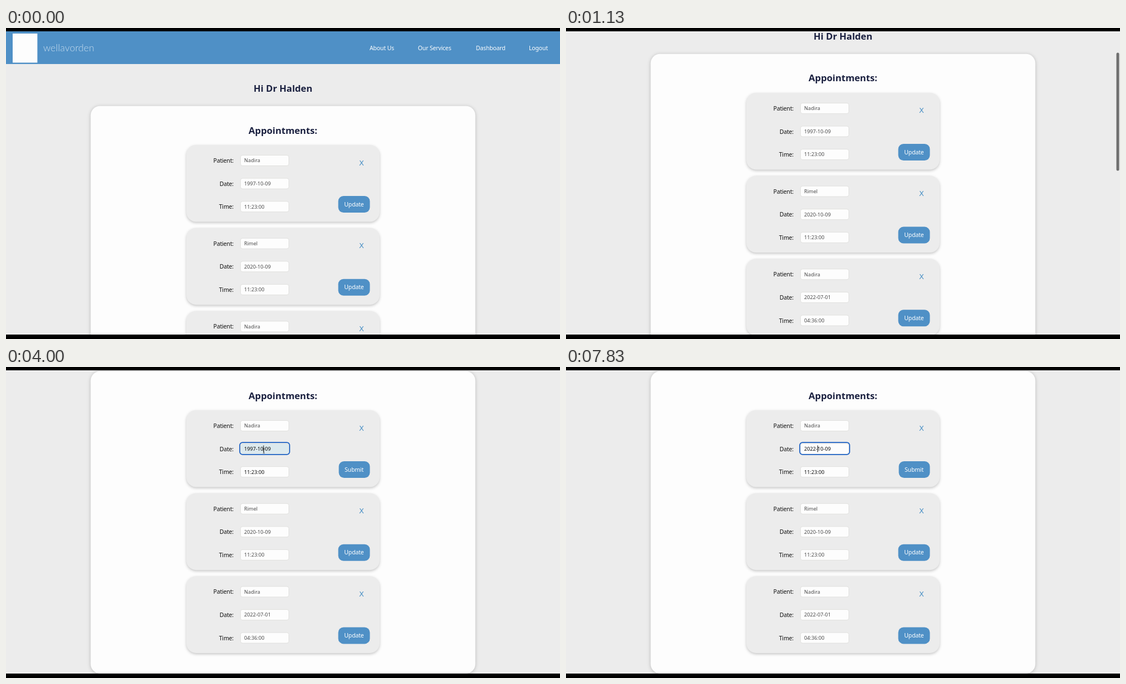
An HTML page that plays this animation: 998 by 561 pixels, repeating every 8 s.

```html
<!DOCTYPE html>
<html lang="en">
<head>
<meta charset="utf-8">
<title>Appointments</title>
<style>
  html, body { margin: 0; width: 100%; height: 100%; overflow: hidden; background: #000; }
  svg { display: block; width: 100vw; height: 100vh; }
  text { font: 10.5px "Noto Sans", "Open Sans", sans-serif; letter-spacing: -.15px; fill: #111; }
  .title { font-size: 16.7px; font-weight: 700; letter-spacing: 0; fill: #1b2140; text-anchor: middle; }
  .nav, .action { fill: #fff; }
  .action { text-anchor: middle; }
  .brand { font: 300 17.5px Lato, sans-serif; letter-spacing: .1px; fill: #c6dcee; }
  .label { text-anchor: end; }
  .value { font-size: 9.2px; letter-spacing: 0; fill: #4c4c4c; }
  .value.live { fill: #0c0c0c; }
  .close { font: 13px "DejaVu Sans", sans-serif; fill: #4a90c5; text-anchor: middle; }
  .field { fill: #fdfdfd; stroke: #e0e0de; }
  .panel { fill: #fdfdfd; filter: drop-shadow(0 1px 3px rgba(0, 0, 0, .22)); }
  .card { fill: #ececec; filter: drop-shadow(0 2px 2.5px rgba(0, 0, 0, .22)); }
</style>
</head>
<body>
<svg id="stage" viewBox="0 0 998 561" preserveAspectRatio="none"></svg>
<script>
const LOOP = 8000;
const BLUE = '#4f90c6';
const SCROLL_END = 133;
const FIELD_X = 422, ROW = 41.6, PITCH = 149.7;

const appointments = [
  ['Nadira', '1997-10-09', '11:23:00'],
  ['Rimel', '2020-10-09', '11:23:00'],
  ['Nadira', '2022-07-01', '04:36:00'],
];

// Pointer stops: time, x, y
const pointerStops = [
  [1600, 700, 566], [2250, 607, 183.5], [3000, 607, 183.5],
  [3800, 464.5, 151], [4230, 464.5, 151], [4570, 477, 163],
];

// Edits of the focused date: time, text, caret index
const edits = [
  [3950, '1997-10-09', 7], [4970, '1997-10-09', 6], [5070, '1997-10-09', 5],
  [5330, '1997-10-09', 4], [5830, '199-10-09', 3], [5900, '19-10-09', 2],
  [6000, '1-10-09', 1], [6070, '-10-09', 0], [6470, '2-10-09', 1],
  [6870, '20-10-09', 2], [7050, '202-10-09', 3], [7230, '2022-10-09', 4],
  [7830, '2022-10-09', 5],
];

const rect = (x, y, w, h, r, attrs) =>
  `<rect x="${x}" y="${y}" width="${w}" height="${h}" rx="${r}" ${attrs}/>`;
const text = (x, y, cls, str, attrs = '') =>
  `<text x="${x}" y="${y}" class="${cls}" ${attrs}>${str}</text>`;

function fieldRow(label, value, row, card) {
  const y = 18 + row * ROW;
  const id = `c${card}r${row}`;
  return text(410, y + 14, 'label', label + ':') +
    rect(FIELD_X + .5, y + .5, 87, 19, 3.5, `class="field" id="${id}box"`) +
    text(429, y + 13.3, 'value', value, `id="${id}"`);
}

function card(values, i) {
  const rows = ['Patient', 'Date', 'Time'].map((l, r) => fieldRow(l, values[r], r, i));
  return `<g transform="translate(0 ${211 + i * PITCH})">
    ${rect(325, 0, 348, 138.5, 17.5, 'class="card"')}${rows.join('')}
    ${text(640.5, 36.5, 'close', 'X')}
    ${rect(598.5, 92, 57, 30, 9.5, `fill="${BLUE}" id="button${i}"`)}
    ${text(627, 110.8, 'action', 'Update', `id="action${i}"`)}
  </g>`;
}

const nav = [[655, 'About Us'], [742, 'Our Services'], [846.5, 'Dashboard'], [942, 'Logout']];

const stage = document.getElementById('stage');
stage.innerHTML = `
  <defs><clipPath id="view"><rect y="6" width="998" height="547"/></clipPath></defs>
  <rect width="998" height="561"/>
  <g clip-path="url(#view)">
    <rect y="6" width="998" height="547" fill="#ececec"/>
    <g id="page">
      <rect y="6" width="998" height="59" fill="${BLUE}"/>
      ${rect(12, 10, 44.5, 52.5, 0, 'fill="#fdfdfd"')}
      ${text(67, 41.5, 'brand', 'wellavorden')}
      ${nav.map(([x, s]) => text(x, 40, 'nav', s)).join('')}
      ${text(499, 115, 'title', 'Hi Dr Halden')}
      ${rect(152.5, 140.8, 693, 545, 17, 'class="panel"')}
      ${text(499, 190.5, 'title', 'Appointments:')}
      ${appointments.map(card).join('')}
    </g>
    ${rect(421.1, 136.1, 89.8, 21.8, 5, 'id="ring" fill="none" stroke="#1b60c4" stroke-width="1.7"')}
    <rect id="caret" y="141.5" width="1" height="12" fill="#111"/>
    ${rect(991.5, 0, 5, 213, 2.5, 'id="thumb" fill="#6f6f6f"')}
    <g id="pointer">
      <path id="arrow" d="M0 0V10L2.3 7.9L3.8 11.3L5.4 10.6L3.9 7.3H7Z"
        fill="#111" stroke="#fff" stroke-width=".8"/>
      <path id="hand" d="M-.9 .8Q0-.6 .9 .8V4L4.8 4.8Q6.2 5.2 6 6.8L5.2 10.5H-.5L-3 6.8Q-3.2 5.4-1.9 5.8L-.9 6.8Z"
        fill="#fff" stroke="#111" stroke-width=".8"/>
      <path id="beam" d="M-1.6-4.5Q0-4.5 0-3.5Q0-4.5 1.6-4.5M0-3.5V3.5M-1.6 4.5Q0 4.5 0 3.5Q0 4.5 1.6 4.5"
        fill="none" stroke="#333" stroke-width=".9"/>
    </g>
  </g>`;

const $ = id => document.getElementById(id);
const set = (id, attrs) => {
  for (const k in attrs) $(id).setAttribute(k, attrs[k]);
};
const show = (id, on) => set(id, { visibility: on ? 'visible' : 'hidden' });
const ramp = (t, a, b) => Math.min(1, Math.max(0, (t - a) / (b - a)));
const smooth = u => u * u * (3 - 2 * u);
const mix = (a, b, u) => a + (b - a) * u;
const blend = (a, b, u) => `rgb(${a.map((v, i) => Math.round(mix(v, b[i], u)))})`;

function pointerAt(t) {
  let [, x, y] = pointerStops[0];
  for (let i = 1; i < pointerStops.length; i++) {
    const a = pointerStops[i - 1], b = pointerStops[i];
    if (t < a[0]) break;
    const u = smooth(ramp(t, a[0], b[0]));
    x = mix(a[1], b[1], u);
    y = mix(a[2], b[2], u);
  }
  return [x, y];
}

function drawPointer(t) {
  const [x, y] = pointerAt(t);
  const overButton = x > 598 && x < 656 && y > 170 && y < 200;
  const overField = x > 421 && x < 511 && y > 137 && y < 158;
  const on = t >= 1600 && t < 6470;
  set('pointer', { transform: `translate(${x} ${y})` });
  show('hand', on && overButton);
  show('beam', on && overField);
  show('arrow', on && !overButton && !overField);
}

function drawForm(t) {
  const editing = t >= 2450;
  const dark = ramp(t, 2170, 2350) - ramp(t, 3160, 3340);
  set('button0', {
    x: editing ? 599.5 : 598.5,
    width: editing ? 56 : 57,
    fill: blend([79, 144, 198], [26, 35, 66], dark),
  });
  $('action0').textContent = editing ? 'Submit' : 'Update';
  for (const id of ['c0r1', 'c0r2']) $(id).classList.toggle('live', editing);

  const tint = ramp(t, 3680, 3800) - ramp(t, 4420, 4550);
  $('c0r1box').style.fill = blend([253, 253, 253], [220, 233, 238], tint);

  const edit = edits.filter(e => e[0] <= t).pop();
  const date = $('c0r1');
  date.textContent = edit ? edit[1] : appointments[0][1];
  show('ring', edit);
  show('caret', edit && (t - edit[0]) % 1000 < 470);
  if (edit) {
    const n = edit[2];
    set('caret', { x: 429 + (n ? date.getSubStringLength(0, n) : .3) });
  }
}

function draw(t) {
  const scroll = SCROLL_END * smooth(ramp(t, 356, 1563));
  set('page', { transform: `translate(0 ${-scroll})` });
  set('thumb', {
    y: 7.6 + scroll * .392,
    opacity: ramp(t, 356, 450) - ramp(t, 2050, 2300),
  });
  drawForm(t);
  drawPointer(t);
}

const start = performance.now();
function tick() {
  draw((performance.now() - start) % LOOP);
  requestAnimationFrame(tick);
}
tick();
</script>
</body>
</html>
```
